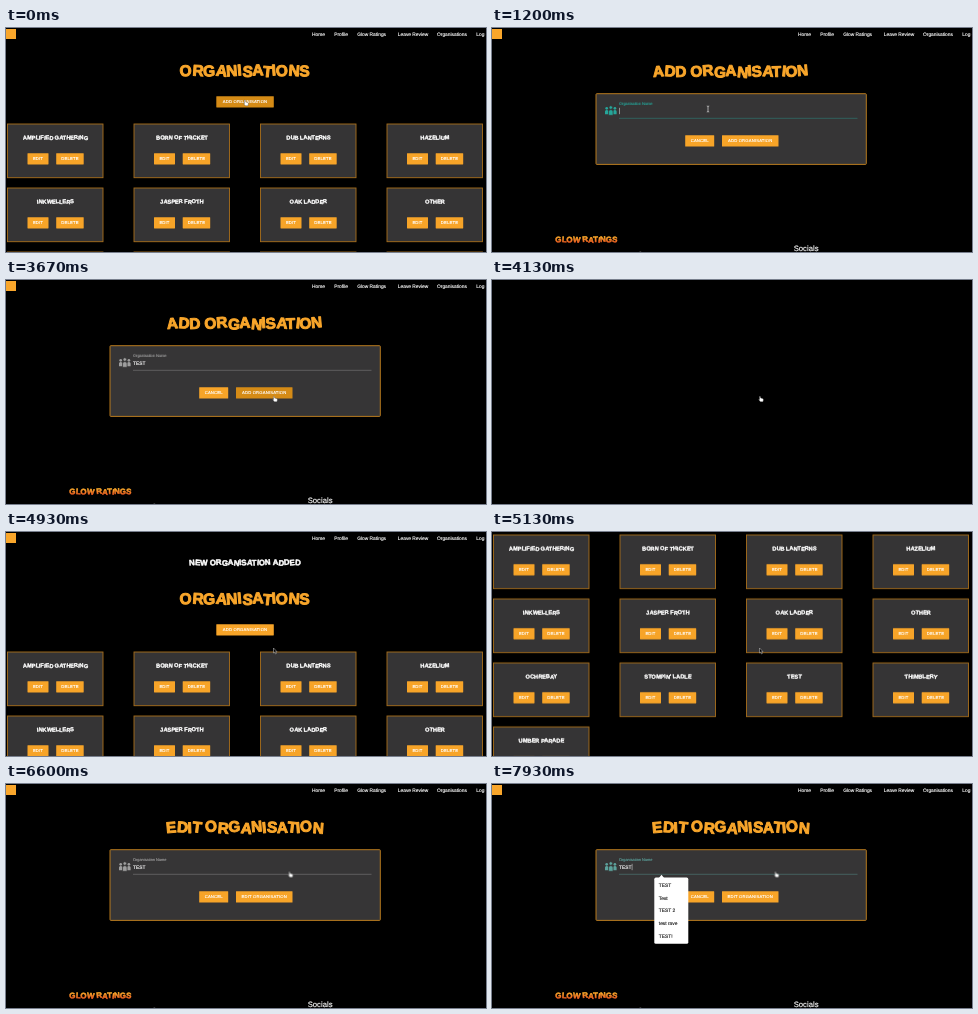
Write an HTML page that moves like this. It is 480x224 px and loops after 8000 ms.

```html
<!DOCTYPE html>
<html lang="en">
<head>
<meta charset="utf-8">
<title>Organisations</title>
<style>
html, body { margin: 0; width: 100%; height: 100%; overflow: hidden; background: #000; }
svg { display: block; width: 100%; height: 100%; }
text { font: 4.85px "Liberation Sans", Arial, sans-serif; fill: #fff; stroke: #fff; stroke-width: .14px; text-rendering: geometricPrecision; white-space: pre; }
.tag { font-weight: bold; text-anchor: middle; stroke: currentColor; fill: currentColor; stroke-linejoin: round; }
.flame { fill: url(#flame); stroke: url(#flame); }
.btn rect { fill: #f7a428; }
.btn text { font-size: 4.24px; letter-spacing: .15px; text-anchor: middle; }
.card { fill: #353435; stroke: #a86f1c; stroke-width: .9; }
.panel { fill: #363536; stroke: #c9851f; stroke-width: .9; }
.label { transform: translate(127px, 77px) scale(.8); fill: currentColor; stroke: currentColor; }
.menu text { fill: #222; stroke: #222; }
.field { color: #9e9e9e; }

.page, .page *, #cursor, #cursor * { animation: 8s linear infinite; }
#list { animation-name: list; }
#add { animation-name: add; }
#edit { animation-name: edit; }
#scroll { animation-name: scroll; }
#body { animation-name: shift; animation-timing-function: step-end; }
#notice { animation-name: notice; animation-timing-function: step-end; }
#add .field { animation-name: focusAdd; }
#edit .field { animation-name: focusEdit; }
#add .label { animation-name: float; }
#add .menu { animation-name: menuAdd; animation-timing-function: step-end; }
#edit .menu, #edit .caret { animation-name: menuEdit; animation-timing-function: step-end; }
#add .caret { animation-name: caret; animation-timing-function: step-end; }
#add .key { animation: key 8s step-end infinite; animation-delay: calc(var(--t) - 8s); }
#edit .caret { transform: translateX(12.6px); }
#listAdd rect { animation-name: hoverList; animation-timing-function: step-end; }
#cardEdit rect { animation-name: hoverCard; animation-timing-function: step-end; }
#add .submit rect { animation-name: hoverSubmit; animation-timing-function: step-end; }
#cursor { animation-name: move; animation-timing-function: ease-in-out; }
#hand { animation-name: hand; animation-timing-function: step-end; }
#arrow { animation-name: arrow; animation-timing-function: step-end; }
#beam { animation-name: beam; animation-timing-function: step-end; }

@keyframes list { 0%, .9% { opacity: 1 } 3.4%, 53.2% { opacity: 0 } 55%, 79% { opacity: 1 } 80.8%, 100% { opacity: 0 } }
@keyframes add { 0%, 4.1% { opacity: 0 } 8.75%, 48.1% { opacity: 1 } 51.3%, 100% { opacity: 0 } }
@keyframes edit { 0%, 80.7% { opacity: 0 } 82.5%, 100% { opacity: 1 } }
@keyframes scroll {
  0%, 62% { transform: none; animation-timing-function: ease-in-out }
  65.9%, 85% { transform: translateY(-201px); animation-timing-function: step-end }
  90%, 100% { transform: none }
}
@keyframes shift { 0% { transform: none } 30%, 100% { transform: translateY(24px) } }
@keyframes notice { 0% { opacity: 0 } 30%, 100% { opacity: 1 } }
@keyframes focusAdd { 0%, 12.5% { color: #9e9e9e } 14.8%, 36.5% { color: #26a69a } 39.5%, 100% { color: #9e9e9e } }
@keyframes focusEdit { 0%, 98.1% { color: #9e9e9e } 100% { color: #26a69a } }
@keyframes float {
  0%, 12.5% { transform: translate(127px, 85px) scale(1); animation-timing-function: ease-out }
  14.6%, 100% { transform: translate(127px, 77px) scale(.8) }
}
@keyframes menuAdd { 0% { opacity: 0 } 23.3% { opacity: 1 } 34.1%, 100% { opacity: 0 } }
@keyframes menuEdit { 0% { opacity: 0 } 98.3%, 100% { opacity: 1 } }
@keyframes caret {
  0% { opacity: 0; transform: none } 12.5% { opacity: 1; transform: none } 20% { opacity: 0; transform: none }
  23.3% { opacity: 1; transform: translateX(3.1px) } 26.6% { opacity: 1; transform: translateX(6.3px) }
  28.3% { opacity: 1; transform: translateX(9.5px) } 30% { opacity: 1; transform: translateX(12.6px) }
  36.5%, 100% { opacity: 0; transform: translateX(12.6px) }
}
@keyframes key { 0% { fill: #fff; stroke: #fff } 50%, 100% { fill: transparent; stroke: transparent } }
@keyframes hoverList { 0% { fill: #d58b16 } 30%, 100% { fill: #f7a428 } }
@keyframes hoverCard { 0% { fill: #f7a428 } 73.3% { fill: #cf8512 } 85%, 100% { fill: #f7a428 } }
@keyframes hoverSubmit { 0% { fill: #f7a428 } 38.7%, 100% { fill: #d58b16 } }
@keyframes move {
  0%, 6.25% { transform: translate(240px, 75px) } 10.9%, 33.75% { transform: translate(216px, 81px) }
  39.1%, 68.4% { transform: translate(269px, 119px) } 73.4%, 100% { transform: translate(284.5px, 90.5px) }
}
@keyframes hand { 0% { opacity: 1 } 4.1% { opacity: 0 } 38.7% { opacity: 1 } 55% { opacity: 0 } 73.3%, 100% { opacity: 1 } }
@keyframes arrow { 0% { opacity: 0 } 4.1% { opacity: 1 } 9% { opacity: 0 } 33.75% { opacity: 1 } 38.7% { opacity: 0 } 55% { opacity: 1 } 73.3%, 100% { opacity: 0 } }
@keyframes beam { 0% { opacity: 0 } 9% { opacity: 1 } 23.3%, 100% { opacity: 0 } }
</style>
</head>
<body>
<svg id="stage" viewBox="0 0 480 224"></svg>
<script>
const ORANGE = '#f9a62b';
const text = (x, y, s, size = 4.85) => `<text x="${x}" y="${y}" style="font-size:${size}px">${s}</text>`;

// Marker-style lettering: heavy capitals, tilted and bouncing on the baseline.
const tag = (x, y, s, size, color = '#fff', kind = '') => {
  const each = f => [...s].map((_, i) => f(i)).join(' ');
  const tilt = each(i => [-5, 4, -2, 6, -4][i % 5]);
  const hop = each(i => i ? (i % 2 ? -.06 : .06) * size : .03 * size);
  return `<text class="tag ${kind}" x="${x}" y="${y + size * .36}" rotate="${tilt}" dy="${hop}"
    style="font-size:${size}px;color:${color};stroke-width:${size * .065}px">${s}</text>`;
};

const button = (x, y, w, h, s, attrs = 'class="btn"') =>
  `<g ${attrs}><rect x="${x}" y="${y}" width="${w}" height="${h}" rx=".4"/>
   <text x="${x + w / 2}" y="${y + h / 2 + 1.5}">${s}</text></g>`;

const nav = () => `<rect y="1" width="10" height="10" fill="${ORANGE}"/>` + [
  [306, 'Home'], [328.2, 'Profile'], [351.2, 'Glow Ratings'],
  [391.8, 'Leave Review'], [431, 'Organisations'], [470.3, 'Log Out']
].map(([x, s]) => text(x, 8, s)).join('');

const footer = dy => `<g transform="translate(0 ${dy})">
  ${tag(94.5, 194.5, 'GLOW RATINGS', 7.9, ORANGE, 'flame')}
  ${text(65.5, 211.8, 'Created and designed by Tovil4837')}
  <circle cx="148.3" cy="209.7" r="3" fill="#fff"/>
  ${text(65.5, 223.8, 'Please get in touch')}
  <path d="M108 219.5h6v5h-6z" fill="#fff"/><path d="M108 220.3l3 2.2 3-2.2" fill="none" stroke="#000" stroke-width=".6"/>
  ${text(301.7, 206, 'Socials', 7.7)}
  <circle cx="305" cy="217.5" r="3" fill="#fff"/><circle cx="305" cy="226" r="3" fill="#fff"/>
</g>`;

const names = ['AMPLIFIED GATHERING', 'BORN OF THICKET', 'DUB LANTERNS', 'HAZELIUM',
  'INKWELLERS', 'JASPER FROTH', 'OAK LADDER', 'OTHER',
  'OCHREBAY', "STOMPIN' LADLE", 'TEST', 'THIMBLERY', 'UMBER PARADE'];

const card = (name, i) => {
  const x = 1.5 + (i % 4) * 126.5, y = 96 + Math.floor(i / 4) * 64;
  const attrs = name === 'TEST' ? 'class="btn" id="cardEdit"' : 'class="btn"';
  return `<rect class="card" x="${x}" y="${y}" width="95.5" height="53.7"/>
    ${tag(x + 48, y + 13.5, name, 5.6)}
    ${button(x + 20, y + 29.2, 21, 11.3, 'EDIT', attrs)}
    ${button(x + 48.7, y + 29.2, 27.5, 11.3, 'DELETE')}`;
};

const list = () => `<g id="list" class="page"><g id="scroll">
  ${nav()}
  <g id="notice">${tag(239, 30.5, 'NEW ORGANISATION ADDED', 7.9)}</g>
  <g id="body">
    ${tag(239, 42.5, 'ORGANISATIONS', 15.5, ORANGE)}
    ${button(210.3, 68.2, 57.5, 11.2, 'ADD ORGANISATION', 'class="btn" id="listAdd"')}
    ${names.map(card).join('')}
    ${footer(177)}
  </g></g></g>`;

const person = (x, y, k) => `<g transform="translate(${x} ${y}) scale(${k})">
  <circle cy="-2.8" r="1.4"/><path d="M-1.8 3.4V.6a1.6 1.6 0 0 1 1.6-1.6h.4A1.6 1.6 0 0 1 1.8 .6v2.8z"/></g>`;

const menu = items => `<g class="menu">
  <path d="M166.5 94.5l3-3.8 3 3.8z" fill="#fff"/>
  <rect x="162.3" y="93.6" width="34" height="66.2" rx="1.6" fill="#fff"/>
  ${items.map((s, i) => text(166.8, 102.8 + i * 12.75, s)).join('')}</g>`;

const typed = ['T', 'E', 'S', 'T']
  .map((c, i) => `<tspan class="key" style="--t:${[1.86, 2.12, 2.26, 2.39][i]}s">${c}</tspan>`).join('');

const form = (id, verb, value, items) => `<g id="${id}" class="page">
  ${nav()}
  ${tag(239, 43, verb + ' ORGANISATION', 15.3, ORANGE)}
  <rect class="panel" x="104" y="65.7" width="270.3" height="70.7" rx=".8"/>
  <g class="field">
    <g fill="currentColor">${person(114.7, 83, .95)}${person(122.9, 83, .95)}
      <g stroke="#363536" stroke-width=".5">${person(118.8, 83, 1.25)}</g></g>
    <text class="label">Organisation Name</text>
    <path d="M127 90.3H365.5" stroke="currentColor" stroke-width=".4"/>
  </g>
  ${text(127, 84.7, value)}
  <path class="caret" d="M127.4 79.8v6.4" stroke="#fff" stroke-width=".5"/>
  ${button(193.2, 107.2, 29, 11.4, 'CANCEL')}
  ${button(230, 107.2, 56.5, 11.4, verb + ' ORGANISATION', 'class="btn submit"')}
  ${footer(17)}
  ${menu(items)}
</g>`;

const cursor = `<g id="cursor">
  <path id="hand" d="M-1.6-2.6q.6-.5 1 .2l.3 1.5 1.8.4q1.1.3.9 1.4l-.4 1.8H-.6L-2.3.7q-.2-.8.9-.2z"
    fill="#fff" stroke="#222" stroke-width=".3"/>
  <path id="arrow" d="M-1.5-3v5l1.1-1 .8 1.9.9-.4-.8-1.8h1.5z" fill="#000" stroke="#ccc" stroke-width=".5"/>
  <path id="beam" d="M-1.2-3Q0-3 0-2.2V2.2Q0 3-1.2 3M1.2-3Q0-3 0-2.2M0 2.2Q0 3 1.2 3"
    fill="none" stroke="#ddd" stroke-width=".7"/>
</g>`;

document.getElementById('stage').innerHTML = `<defs>
  <linearGradient id="flame" x2="0" y2="1"><stop offset=".2" stop-color="#ffae2b"/><stop offset="1" stop-color="#e5391c"/></linearGradient>
  </defs><rect width="480" height="224"/>` + list() +
  form('add', 'ADD', typed, ['Test', 'TEST', 'TEST 2', 'test rave', 'TEST!']) +
  form('edit', 'EDIT', 'TEST', ['TEST', 'Test', 'TEST 2', 'test rave', 'TEST!']) + cursor;
</script>
</body>
</html>
```
